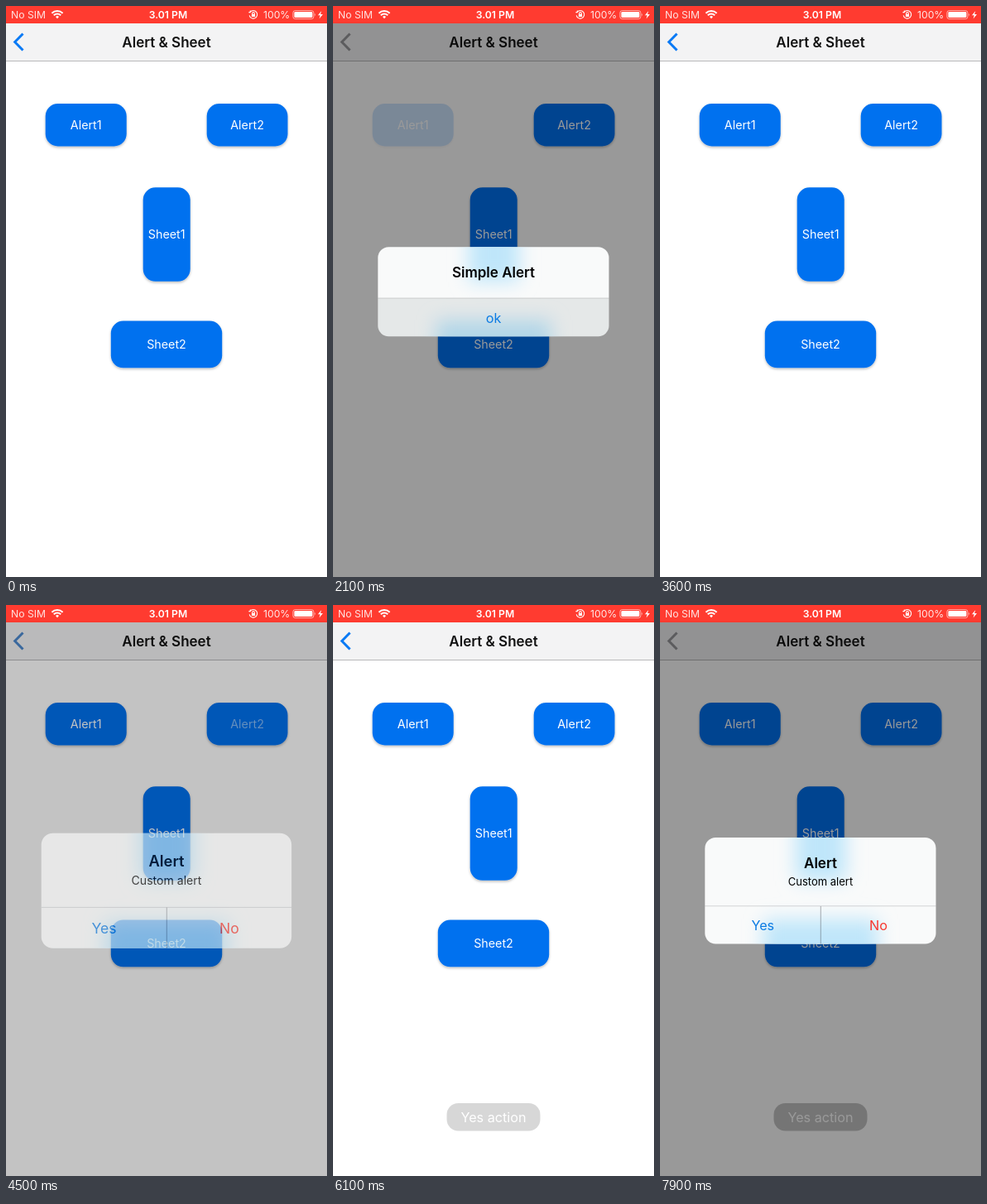
Animation, 388 px wide and 690 px high, one loop 8000 ms. Source, as an HTML page:

```html
<!DOCTYPE html>
<html lang="en">
<head>
<meta charset="utf-8">
<title>Alert &amp; Sheet</title>
<style>
  html, body { margin: 0; width: 100%; height: 100%; overflow: hidden; background: #fff; }
  svg { display: block; width: 388px; height: 690px; font-family: Inter, Roboto, sans-serif; }
  .mid { text-anchor: middle; }
  .bold { font-weight: 600; }
  .label { fill: #fff; font-size: 14.3px; }
  .status { fill: #fff; font-size: 12.2px; }
  .title { font-size: 17px; font-weight: 600; fill: #111; }
  .action { font-size: 16.2px; }
  .card .title { fill: #000; }
</style>
</head>
<body>
<svg viewBox="0 0 388 690">
  <defs>
    <filter id="shadow" x="-20%" y="-20%" width="140%" height="150%">
      <feDropShadow dx="0" dy="1.5" stdDeviation="1.5" flood-color="#000" flood-opacity=".28"/>
    </filter>
    <filter id="soft" x="-60%" y="-60%" width="220%" height="220%">
      <feGaussianBlur stdDeviation="11"/>
    </filter>
    <clipPath id="clip1"><rect x="54.3" y="291.3" width="279.2" height="108" rx="13"/></clipPath>
    <clipPath id="clip2"><rect x="54.3" y="281" width="279.2" height="128.5" rx="13"/></clipPath>
    <g id="glass">
      <rect x="50" y="275" width="290" height="140" fill="#f9fafa"/>
      <g filter="url(#soft)" fill="#bfe6fa">
        <rect x="164" y="219" width="61" height="114"/>
        <rect x="125" y="380" width="138" height="57"/>
      </g>
    </g>
  </defs>

  <rect width="388" height="690" fill="#fff"/>
  <rect y="20" width="388" height="46" fill="#f3f3f4"/>
  <rect y="66" width="388" height="1" fill="#b9b9bb"/>
  <text class="title mid" x="194" y="49.5">Alert &amp; Sheet</text>

  <g id="buttons"></g>

  <g id="toast">
    <rect x="137.5" y="602" width="113" height="33.5" rx="14" fill="#666"/>
    <text class="action mid" x="194" y="625" fill="#fff">Yes action</text>
  </g>

  <rect id="dim" y="20" width="388" height="670"/>
  <path id="chevron" d="M20.5 33.5L10.7 43.5L20.5 53.5" fill="none" stroke-width="3"/>

  <g>
    <rect width="388" height="21" fill="#ff3b30"/>
    <text class="status" x="6" y="15" opacity=".85">No SIM</text>
    <g fill="none" stroke="#fff" stroke-width="2">
      <path d="M55.4 8.8a9.4 9.4 0 0 1 13.2 0M57.8 11.3a6 6 0 0 1 8.4 0"/>
      <path d="M60 13a2.9 2.9 0 0 1 4 0l-2 2.2z" fill="#fff" stroke="none"/>
    </g>
    <text class="status mid bold" x="196" y="15">3.01 PM</text>
    <g fill="none" stroke="#fff" stroke-width="1.1">
      <path d="M295.2 7.2a4.8 4.8 0 1 1-1 4.2M293.4 7.6l1.9 0 0-2"/>
      <rect x="296.9" y="9.8" width="4.2" height="3.2" fill="#fff" stroke="none"/>
      <path d="M297.7 10V8.8a1.3 1.3 0 0 1 2.6 0V10"/>
    </g>
    <text class="status" x="311" y="15" opacity=".88">100%</text>
    <rect x="346.9" y="5.6" width="25" height="10" rx="2.6" fill="none" stroke="#fff" stroke-opacity=".6"/>
    <rect x="348.4" y="7.1" width="22" height="7" rx="1.3" fill="#fff"/>
    <path d="M373 8.8q1.7 1.8 0 3.6z" fill="#fff" opacity=".7"/>
    <path d="M381.3 6L377 11.2h2.8L378.6 15.4L383 10h-2.9z" fill="#fff"/>
  </g>

  <g id="card1" class="card">
    <g clip-path="url(#clip1)">
      <use href="#glass"/>
      <rect id="press1" x="54" y="353" width="280" height="47" fill="#405058" opacity="0"/>
      <rect x="54" y="352.6" width="280" height=".8" fill="#3c3c43" opacity=".25"/>
    </g>
    <text class="title mid" x="194" y="328">Simple Alert</text>
    <text class="action mid" x="194" y="382.7" fill="#0b7be3">ok</text>
  </g>

  <g id="card2" class="card">
    <g clip-path="url(#clip2)">
      <use href="#glass"/>
      <rect id="press2" x="54" y="364" width="140" height="46" fill="#405058" opacity="0"/>
      <rect x="54" y="363.4" width="280" height=".8" fill="#3c3c43" opacity=".25"/>
      <rect x="193.8" y="364" width=".9" height="46" fill="#3c3c43" opacity=".45"/>
    </g>
    <text class="title mid" x="194" y="318">Alert</text>
    <text class="mid" x="194" y="339" font-size="13">Custom alert</text>
    <text class="action mid" x="124.3" y="393" fill="#0b7be3">Yes</text>
    <text class="action mid" x="264" y="393" fill="#f8382e">No</text>
  </g>
</svg>
<script>
const LOOP = 8000;
const $ = id => document.getElementById(id);
const fade = (id, value) => $(id).setAttribute('opacity', value);

const buttons = [
  ['Alert1', 47.7, 118, 98, 51.5],
  ['Alert2', 242.7, 118, 97.8, 51.5],
  ['Sheet1', 165.7, 219.3, 57, 113.5],
  ['Sheet2', 126.8, 380.5, 134.4, 56.8]
];
$('buttons').innerHTML = buttons.map(([name, x, y, w, h]) => `
  <g id="${name}">
    <rect x="${x}" y="${y}" width="${w}" height="${h}" rx="15" fill="#0071ef" filter="url(#shadow)"/>
    <text id="${name}Text" class="label mid" x="${x + w / 2}" y="${y + h / 2 + 5.2}">${name}</text>
  </g>`).join('');

const alerts = [
  { card: 1, open: 480, close: 2958 },
  { card: 2, open: 4415, close: 5758 },
  { card: 2, open: 7060, close: Infinity }
];

// Critically damped spring, 0 to 1
const spring = t => {
  const x = Math.max(0, t) * 0.02285;
  return 1 - (1 + x) * Math.exp(-x);
};
const ramp = (t, from, to) => Math.min(1, Math.max(0, (t - from) / (to - from)));
const within = (t, from, to) => t >= from && t < to;
const mix = (a, b, k) => `rgb(${a.map((v, i) => Math.round(v + (b[i] - v) * k))})`;

// Title dims on touch, then recovers slowly
const titleDip = (t, down, up) => 0.6 * (ramp(t, down, down + 140) - ramp(t, up, up + 450));

function draw(t) {
  const current = alerts.filter(a => t >= a.open).pop();
  const grow = current ? spring(t - current.open) : 0;
  const shown = current ? grow * (1 - spring(t - current.close)) : 0;

  for (const n of [1, 2]) {
    const visible = current && current.card === n && shown > 0.004;
    const card = $('card' + n);
    card.style.display = visible ? '' : 'none';
    const scale = 1.2 - 0.2 * grow;
    card.setAttribute('transform', `translate(193.9 345.3) scale(${scale}) translate(-193.9 -345.3)`);
    fade('card' + n, Math.pow(shown, 0.75));
  }
  fade('dim', 0.4 * shown);
  $('chevron').setAttribute('stroke', mix([10, 122, 245], [92, 92, 94], shown));

  fade('Alert1', 1 - 0.8 * (ramp(t, 150, 300) - ramp(t, 3300, 3550)));
  fade('Alert2Text', 1 - titleDip(t, 4150, 4420) - titleDip(t, 6800, 7065));
  fade('press1', within(t, 2000, 2940) ? 0.11 : 0);
  fade('press2', within(t, 5480, 5740) ? 0.11 : 0);
  fade('toast', ramp(t, 6050, 6250) - ramp(t, 7710, 8020));
}

const start = performance.now();
function tick() {
  draw((performance.now() - start) % LOOP);
  requestAnimationFrame(tick);
}
draw(0);
requestAnimationFrame(tick);
</script>
</body>
</html>
```
